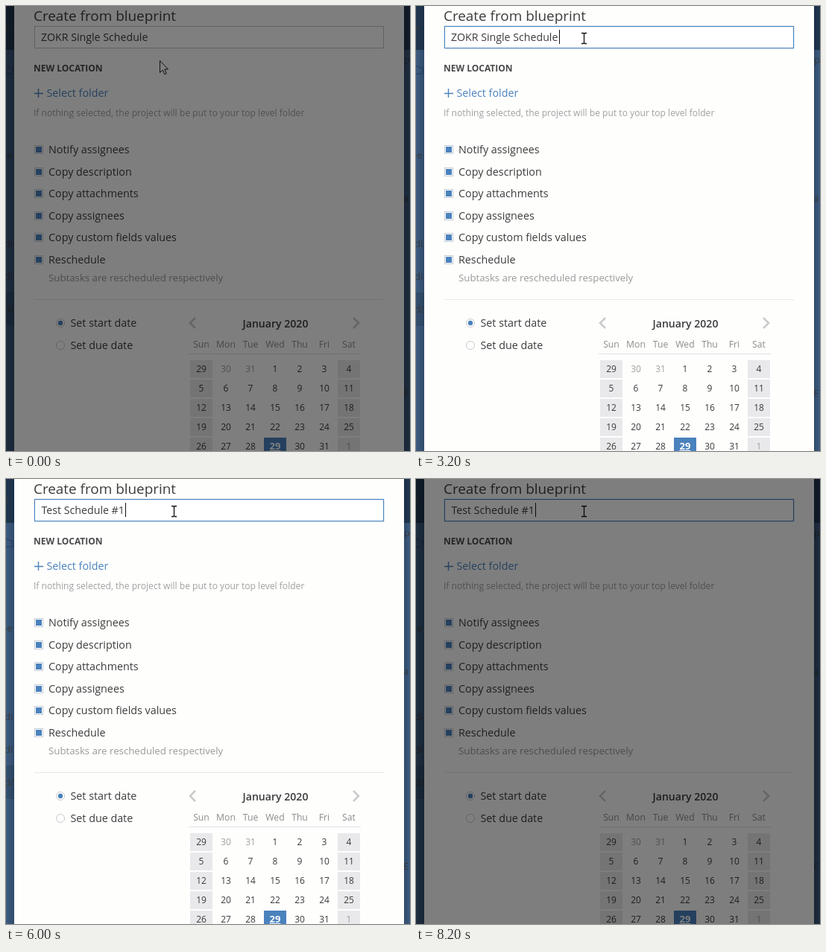
Write an HTML page that moves like this. It is 542 by 598 pixels and loops after 8.4 s.

```html
<!DOCTYPE html>
<html lang="en">
<head>
<meta charset="utf-8">
<title>Create from blueprint</title>
<style>
html, body { margin: 0; width: 100%; height: 100%; overflow: hidden; background: #3d5c80; }
svg { display: block; width: 542px; height: 598px; font: 14.3px "Open Sans", "Noto Sans", sans-serif; }
text { fill: #3c3c3c; white-space: pre; }
.title { font-size: 18.9px; }
.heading { font-size: 12px; font-weight: 700; fill: #4a4a4a; }
.link { fill: #4a82bd; }
.hint { font-size: 12.1px; fill: #a0a0a0; }
.note { font-size: 13.25px; fill: #999; }
.field { font-size: 14.2px; }
.month { font-weight: 600; font-size: 14.1px; }
.weekday { font-size: 12.2px; fill: #8c8c8c; }
.day { font-size: 12px; }
.muted { fill: #a0a0a0; }
.today { font-size: 13px; font-weight: 700; fill: #fff; text-decoration: underline; }
.center { text-anchor: middle; }
.behind { font-size: 13px; fill: #263f5c; }

.dim, .arrow, .beam, .ring, .caret, .old, .marked, .new { animation: 8.4s step-end infinite; }
.dim { animation-name: dim; }
.arrow { animation-name: arrow; }
.beam { animation-name: beam; }
.ring { animation-name: ring; }
.caret { animation-name: caret; }
.old { animation-name: old; }
.marked { animation-name: marked; }
.new { animation-name: new; }

@keyframes dim { 0%, 97.61% { opacity: .5 } 2.38% { opacity: 0 } }
@keyframes arrow {
  0% { transform: translate(206px, 73px); opacity: 1 }
  4.76% { transform: translate(209px, 69px); opacity: 1 }
  7.14% { transform: translate(217px, 58px); opacity: 1 }
  9.52%, 100% { transform: translate(225px, 44px); opacity: 0 }
}
@keyframes beam { 0% { opacity: 0 } 9.52%, 100% { opacity: 1 } }
@keyframes ring { 0% { opacity: 0 } 11.9% { opacity: .6 } 14.28%, 100% { opacity: 1 } }
@keyframes caret {
  0%, 19.04%, 30.95%, 45.23% { transform: translate(192px, 32px); opacity: 0 }
  11.9%, 26.19%, 38.09% { transform: translate(192px, 32px); opacity: 1 }
  71.42%, 83.33%, 95.23%, 100% { transform: translate(160px, 32px); opacity: 1 }
  50%, 76.19%, 90.47% { transform: translate(160px, 32px); opacity: 0 }
}
@keyframes old { 0% { opacity: 1 } 50%, 100% { opacity: 0 } }
@keyframes marked { 0%, 71.42%, 100% { opacity: 0 } 50% { opacity: 1 } }
@keyframes new { 0% { opacity: 0 } 71.42%, 100% { opacity: 1 } }
</style>
</head>
<body>
<svg viewBox="0 0 542 598">
  <defs>
    <linearGradient id="shade">
      <stop offset="0" stop-color="#14253a" stop-opacity="0"/>
      <stop offset="1" stop-color="#14253a" stop-opacity=".3"/>
    </linearGradient>
  </defs>

  <rect width="542" height="598" fill="#3d5c80"/>
  <rect width="542" height="59" fill="#20364f"/>
  <rect y="385" width="11" height="45" fill="#34506f"/>
  <g class="behind">
    <text x="-3" y="33">x</text>
    <text x="-6" y="205">ee</text>
    <text x="-2" y="324">di</text>
    <text x="-2" y="368">di</text>
    <text x="-2" y="412">d/</text>
    <text x="534" y="77">p</text>
    <text x="533" y="263">a</text>
    <text x="533" y="525">E</text>
    <path d="M-2 81H3L5 83H9V91H-2" fill="none" stroke="#263f5c"/>
  </g>
  <rect width="11" height="598" fill="url(#shade)"/>
  <rect width="8" height="598" fill="url(#shade)" transform="matrix(-1 0 0 1 542 0)"/>
  <rect x="11" width="523" height="598" fill="#fefefd"/>

  <text class="title" x="37" y="20">Create from blueprint</text>
  <rect x="38.5" y="27.5" width="468" height="29" fill="#fff" stroke="#c6c6c6"/>
  <g class="ring" fill="none">
    <rect x="37.5" y="26.5" width="470" height="31" rx="1" stroke="#dce8f4"/>
    <rect x="38.5" y="27.5" width="468" height="29" stroke="#4a82bd"/>
  </g>
  <g class="field">
    <text class="old" x="47" y="47">ZOKR Single Schedule</text>
    <g class="marked">
      <rect x="47" y="32" width="145" height="19" fill="#3390ff"/>
      <text x="47" y="47" style="fill:#fff">ZOKR Single Schedule</text>
    </g>
    <text class="new" x="47.5" y="47">Test Schedule #1</text>
  </g>
  <rect class="caret" width="1" height="19" fill="#111"/>

  <text class="heading" x="37" y="88">NEW LOCATION</text>
  <path d="M38 117.5H50M43.5 111V123" stroke="#4a82bd" stroke-width="1.4"/>
  <text class="link" x="54.5" y="122">Select folder</text>
  <text class="hint" x="37" y="148">If nothing selected, the project will be put to your top level folder</text>

  <g id="options"></g>
  <text class="note" x="57" y="370">Subtasks are rescheduled respectively</text>
  <path d="M38 394.5H507" stroke="#e8e8e8"/>

  <g fill="#fff" stroke="#c8c8c8">
    <circle cx="73" cy="426" r="5.5"/>
    <circle cx="73" cy="456" r="5.5"/>
  </g>
  <circle cx="73" cy="426" r="3.2" fill="#4a82bd"/>
  <text x="86.5" y="431">Set start date</text>
  <text x="86.5" y="461">Set due date</text>

  <path d="M254 419L247 426L254 433M466 419L473 426L466 433" fill="none" stroke="#cbcbcb" stroke-width="2.6"/>
  <text class="month center" x="361.5" y="432">January 2020</text>
  <path d="M245 467.5H476" stroke="#e2e2e2"/>
  <g id="calendar"></g>

  <path class="arrow" d="M.5 .5V16.5L4.2 13L6.8 18.8L9.3 17.7L6.8 12H11.5Z" fill="#fff" stroke="#222"/>
  <path class="beam" d="M222 36.5H224.5L225.5 37.5L226.5 36.5H229M225.5 37V50M222 50.5H224.5L225.5 49.5L226.5 50.5H229" fill="none" stroke="#111" stroke-width="1.3"/>
  <rect class="dim" width="542" height="598" fill="#000"/>
</svg>
<script>
const add = (parent, tag, attrs, label = "") => {
  const node = document.createElementNS("http://www.w3.org/2000/svg", tag);
  for (const key in attrs) node.setAttribute(key, attrs[key]);
  node.textContent = label;
  parent.append(node);
};

const options = document.getElementById("options");
["Notify assignees", "Copy description", "Copy attachments", "Copy assignees",
 "Copy custom fields values", "Reschedule"].forEach((label, i) => {
  const y = Math.round(193 + i * 29.6);
  add(options, "rect", { x: 38.5, y: y - 5.5, width: 11, height: 11, fill: "#fff", stroke: "#c3cbd3" });
  add(options, "rect", { x: 40, y: y - 4, width: 8, height: 8, fill: "#4a82bd" });
  add(options, "text", { x: 57, y: y + 5 }, label);
});

const calendar = document.getElementById("calendar");
const columnX = column => 262 + column * 33;
["Sun", "Mon", "Tue", "Wed", "Thu", "Fri", "Sat"].forEach((name, i) =>
  add(calendar, "text", { class: "weekday center", x: columnX(i), y: 459 }, name));

for (let i = 0; i < 35; i++) {
  const column = i % 7, x = columnX(column), y = 488 + Math.floor(i / 7) * 26;
  const date = new Date(2020, 0, i - 2);
  const day = date.getDate(), weekend = column % 6 === 0;
  const today = day === 29 && i > 7;
  const muted = date.getMonth() !== 0 && i !== 0;
  if (weekend || today)
    add(calendar, "rect", { x: x - 15, y: y - 12, width: 30, height: 24, fill: today ? "#4a82bd" : "#e9e9eb" });
  add(calendar, "text", { class: `center day ${today ? "today" : muted ? "muted" : ""}`, x, y: y + 4 }, day);
}
</script>
</body>
</html>
```
